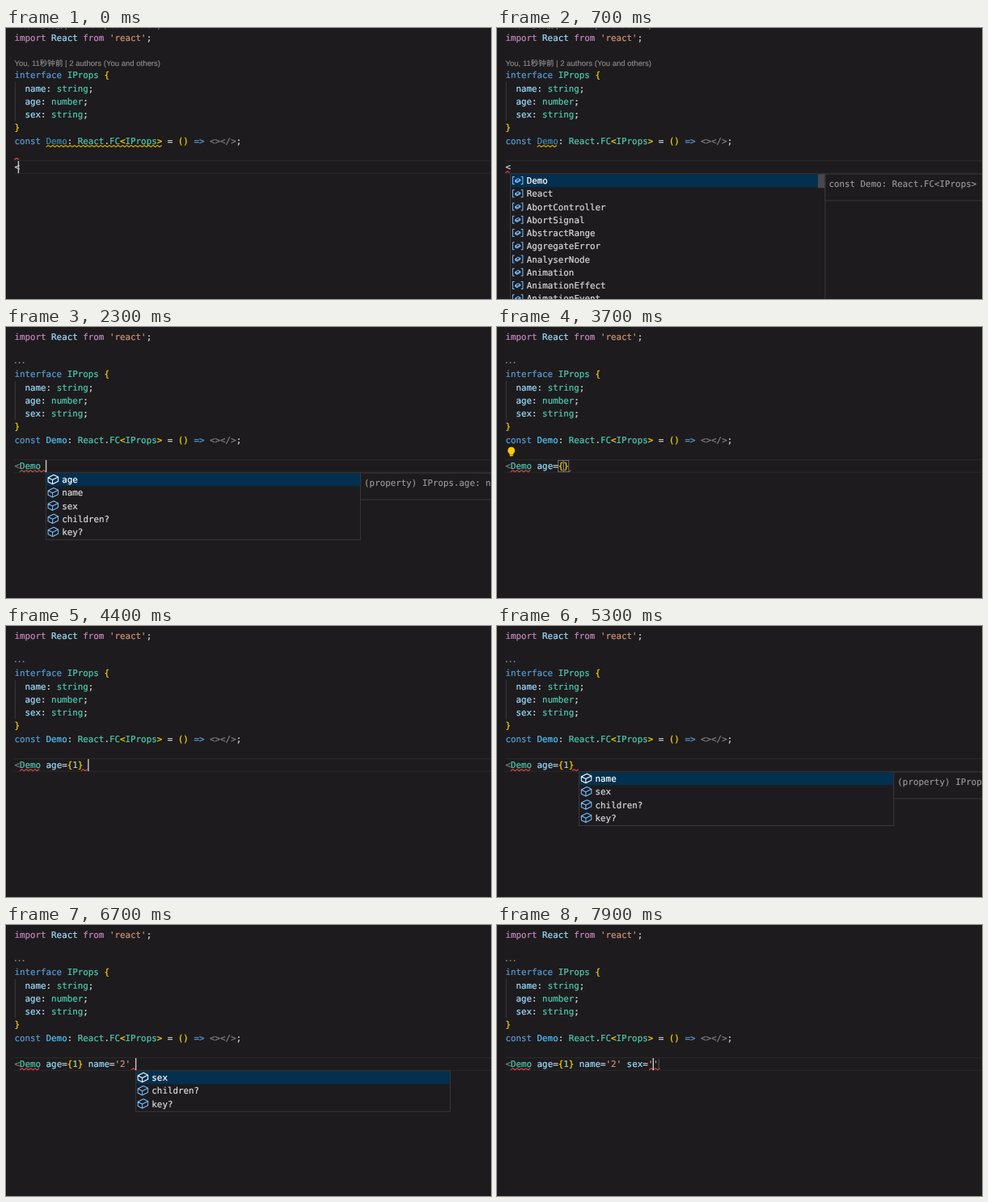
An HTML page for the animation above (8 s loop, 600 by 336 pixels).

```html
<!DOCTYPE html>
<html lang="en">
<head>
<meta charset="utf-8">
<title>Editor completion</title>
<style>
  html, body { margin: 0; width: 100%; height: 100%; overflow: hidden; background: #1d1b1d; }
  svg { display: block; }
  text {
    font: 10.85px "DejaVu Sans Mono", monospace;
    white-space: pre;
    text-rendering: geometricPrecision;
    color: #d8d8d8;
  }
  text, tspan { fill: currentColor; stroke: currentColor; stroke-width: .22px; }
  .lens { font: 9.56px "Liberation Sans", "Noto Sans CJK SC", "Noto Sans CJK", sans-serif; color: #8f8e8f; stroke-width: .12px; }
  .dots { font-weight: bold; letter-spacing: 2.2px; }
  .detail { color: #9d9c9d; stroke-width: .12px; }
  .m { color: #c586c0; } .v { color: #9cdcfe; } .s { color: #ce9178; }
  .k { color: #569cd6; } .t { color: #4ec9b0; } .b { color: #ffd700; }
  .c { color: #4fc1ff; } .u { color: #3a8bb7; } .g { color: #808080; }
  .n { color: #b5cea8; } .w { color: #d8d8d8; }
  .box { fill: #1d1b1d; stroke: #3c3b3d; stroke-width: .9; }
  .icon { fill: none; stroke: #75beff; stroke-width: 1.15; stroke-linejoin: round; }
  .on text { color: #fff; }
  .on .icon.field { stroke: #fff; }
  .wave { fill: none; stroke-width: 1.1; stroke-linejoin: round; }
</style>
</head>
<body>
<svg width="600" height="336" viewBox="0 0 600 336">
  <path d="M10 164.6H600M10 180.2H600" stroke="#2b292b"/>
  <path d="M11.3 67V115.5" stroke="#3d3b3d"/>
  <g id="code"></g>
  <g id="scene"></g>
  <rect id="cursor" y="165" width="1.4" height="15" fill="#c8c8c8"/>
</svg>
<script>
const LOOP = 8000, LEFT = 10.4, CHAR = 6.532, ROW = 16.25;
const $ = id => document.getElementById(id);
const colX = col => LEFT + col * CHAR;
const rowY = row => 62.3 + row * ROW;
const esc = s => s.replace(/&/g, '&amp;').replace(/</g, '&lt;');

// Markup: runs parted by "|", each "class~text".
function line(y, src) {
  const runs = src.split('|').map(run => {
    const [cls, str] = run.split('~');
    return `<tspan class="${cls}">${esc(str)}</tspan>`;
  });
  return `<text x="${LEFT}" y="${y}">${runs.join('')}</text>`;
}

function wave(from, to, y, color) {
  const end = colX(to);
  let d = '', up = false;
  for (let x = colX(from); x <= end + .4; x += 2.7, up = !up)
    d += `${d ? 'L' : 'M'}${x.toFixed(1)} ${y + (up ? 2 : 4)}`;
  return `<path class="wave" d="${d}" stroke="${color}"/>`;
}

const RED = '#f14c4c', YELLOW = '#cca700';
const FIELD = 'M1 5.5 8.8 1.5 15 4.6V10.5L7.2 14.5 1 11.4ZL7.2 8.6 15 4.6M7.2 8.6V14.5';
const VARIABLE = 'M3.5 3H1V13H3.5M12.5 3H15V13H12.5M4.5 8 8.5 5.3 11.5 6.8V8.4L7.4 11 4.5 9.6ZL7.4 9.3 11.5 6.8';

function popup({ col, items, detail, icon = 'field', scroll }, showDetail) {
  const x = colX(col) - .3, width = 389.3, height = items.length * ROW + 1.5;
  const path = icon === 'field' ? FIELD : VARIABLE;
  let out = `<rect class="box" x="${x}" y="181" width="${width}" height="${height}"/>
    <rect x="${x + .5}" y="181.3" width="${width - 1}" height="16" fill="#04304f"/>`;
  if (scroll) out += `<rect x="${x + 380.5}" y="181.3" width="8.6" height="17" fill="#49494b"/>`;
  items.forEach((name, i) => {
    const mid = 189 + i * ROW;
    out += `<g class="${i ? '' : 'on'}">
      <path class="icon ${icon}" transform="translate(${x + 1.9} ${mid - 7.1}) scale(.89)" d="${path}"/>
      <text x="${x + 20}" y="${mid + 4}">${name}</text></g>`;
  });
  if (showDetail) out += `<rect class="box" x="${x + width}" y="181" width="400" height="33"/>
    <text class="detail" x="${x + width + 4.5}" y="197">${esc(detail)}</text>`;
  return out;
}

const globals = {
  col: 1, icon: 'variable', scroll: true, detail: 'const Demo: React.FC<IProps>',
  items: ['Demo', 'React', 'AbortController', 'AbortSignal', 'AbstractRange', 'AggregateError',
    'AnalyserNode', 'Animation', 'AnimationEffect', 'AnimationEvent']
};
const props = (col, detail, ...items) =>
  ({ col, detail: `(property) IProps.${detail}`, items: [...items, 'children?', 'key?'] });
const ageList = props(6, 'age: number', 'age', 'name', 'sex');
const nameList = props(14, 'name: string', 'name', 'sex');
const sexList = props(23, 'sex: string', 'sex');

const TAG = 'g~<|t~Demo';
const AGE = TAG + '|v~ age|w~=|b~{';
const NAME = AGE + '|n~1|b~}|v~ name|w~=';
const SEX = NAME + "|s~'2'|v~ sex|w~=|s~''";

// Each step overrides part of the state before it; "col" restarts the blink.
const steps = [
  // The caret is still gliding past the first character here.
  { at: 0, col: .77, src: 'w~<', stale: true, unused: true, lens: true },
  { at: 100, col: 1 },
  { at: 300, stale: false, red: [[0, 1]], list: globals },
  { at: 500, detail: true },
  { at: 800, lens: false },
  { at: 1300, col: 5, src: TAG, red: [[1, 5]], list: null, detail: false },
  { at: 1700, unused: false },
  { at: 2000, col: 6, src: TAG + '|w~ ', red: [[1, 6]] },
  { at: 2100, list: ageList },
  { at: 2200, detail: true },
  { at: 2900, col: 11, src: AGE + '|b~}', red: [[1, 5], [12, 12.5]], match: [10, 11], list: null, detail: false },
  { at: 3300, bulb: true },
  { at: 3900, col: 12, src: AGE + '|n~1|b~}', red: [[1, 5], [13, 13.5]], match: [10, 12], bulb: false },
  { at: 4200, col: 13 },
  { at: 4400, col: 14, red: [[1, 5], [12.6, 14]], match: null },
  { at: 4500, list: nameList, detail: true },
  { at: 5400, col: 20, src: NAME + "|s~''", red: [[1, 5], [19.3, 21.5]], stop: 21, list: null, detail: false },
  { at: 5800, col: 21, src: NAME + "|s~'2'", red: [[1, 5], [22, 22.5]], stop: 22 },
  { at: 6100, col: 22, stop: 0 },
  { at: 6400, col: 23, red: [[1, 5], [22.1, 23.2]] },
  { at: 6500, list: sexList },
  { at: 6800, detail: true },
  { at: 7500, col: 28, src: SEX, red: [[1, 5], [27.2, 29.5]], stop: 29, list: null, detail: false }
];
let state = { red: [] };
const states = steps.map(step =>
  state = { ...state, ...step, typed: step.col ? step.at : state.typed });

const BULB = `<g fill="#ffcc00"><path d="M17.7 148.8a4.5 4.5 0 0 1 2.4 8.2v1.2h-4.8v-1.2a4.5 4.5 0 0 1 2.4-8.2Z"/>
  <rect x="15.6" y="158.6" width="4.2" height="1.6" rx=".7"/></g>`;

$('code').innerHTML = [
  [16.1, "m~import |v~React |m~from |s~'react'|w~;"],
  [rowY(0), 'k~interface |t~IProps |b~{'],
  [rowY(1), 'v~  name|w~: |t~string|w~;'],
  [rowY(2), 'v~  age|w~: |t~number|w~;'],
  [rowY(3), 'v~  sex|w~: |t~string|w~;'],
  [rowY(4), 'b~}']
].map(args => line(...args)).join('');

function render(s) {
  const lens = y => `<text class="lens" x="10.5" y="${y}">You, 11秒钟前 | 2 authors (You and others)</text>`;
  let out = s.lens ? lens(46.6) + lens(-.5) : '<text class="lens dots" x="10.5" y="44.8">...</text>';
  out += line(rowY(5), `k~const |${s.unused ? 'u' : 'c'}~Demo|w~: |t~React|w~.|t~FC|b~<|t~IProps|b~>|w~ = |b~()|k~ =>|g~ <></>|w~;`);
  if (s.unused) out += wave(6, s.stale ? 28 : 10, rowY(5), YELLOW);
  if (s.stale) out += wave(0, 1, rowY(6) - .5, RED);
  for (const [from, to] of s.red) out += wave(from, to, rowY(7) - .4, RED);
  for (const col of s.match || [])
    out += `<rect x="${colX(col)}" y="165.5" width="${CHAR}" height="14" fill="none" stroke="#828182" stroke-width=".8"/>`;
  if (s.stop) out += `<path d="M${colX(s.stop) + .3} 166V179.5" stroke="#565456"/>`;
  out += line(rowY(7), s.src);
  if (s.bulb) out += BULB;
  if (s.list) out += popup(s.list, s.detail);
  $('scene').innerHTML = out;
  $('cursor').setAttribute('x', colX(s.col) - .7);
}

let shown;
function tick() {
  const t = performance.now() % LOOP;
  const s = states.findLast(item => item.at <= t);
  if (s !== shown) render(shown = s);
  const visible = Math.floor((t - s.typed) / 500) % 2 === 0;
  $('cursor').setAttribute('opacity', visible ? 1 : 0);
  requestAnimationFrame(tick);
}
tick();
</script>
</body>
</html>
```
